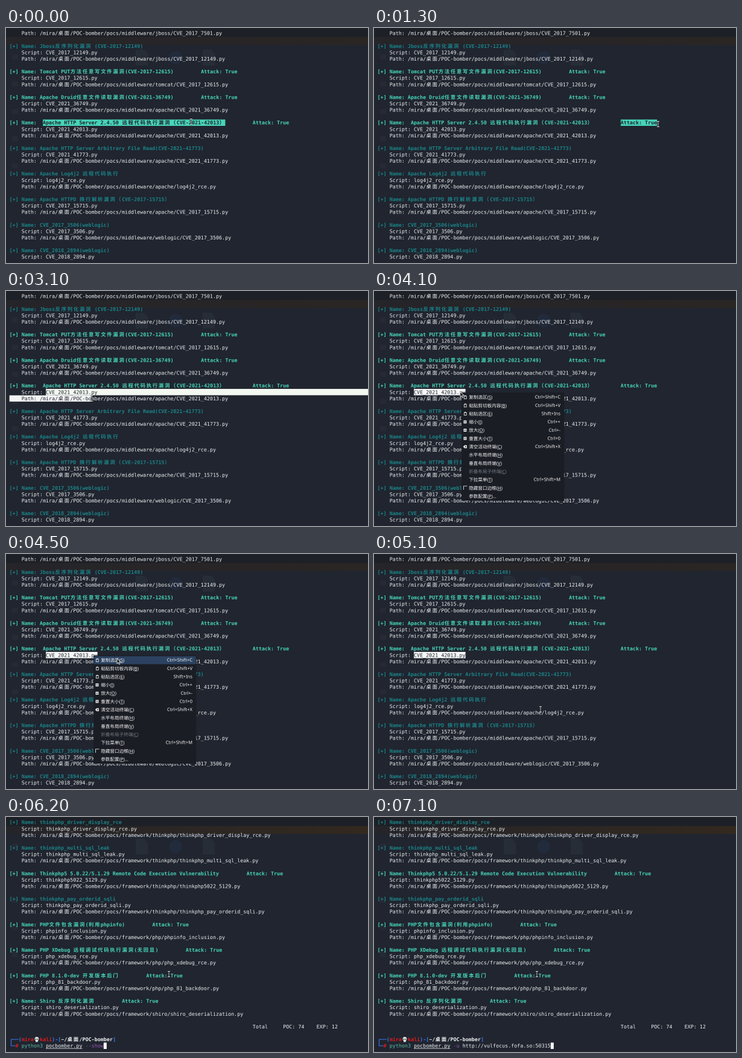
Animation of 600x389 px, one loop 8000 ms. Source, as an HTML page with a canvas:

```html
<!DOCTYPE html>
<html lang="zh">
<head>
<meta charset="utf-8">
<title>Terminal</title>
<style>
html, body { margin: 0; width: 100%; height: 100%; overflow: hidden; background: #20242e; }
canvas { display: block; width: 600px; height: 389px; }
</style>
</head>
<body>
<canvas id="stage" width="600" height="389"></canvas>
<script>
const W = 600, H = 389, LOOP = 8000, STEP = 100;
const stage = document.getElementById('stage').getContext('2d');

// Everything is drawn at double size, then scaled down for soft, exact positions.
const buffer = document.createElement('canvas');
buffer.width = W * 2;
buffer.height = H * 2;
const ctx = buffer.getContext('2d');
ctx.scale(2, 2);
ctx.textRendering = 'geometricPrecision';

const X0 = 5.6, CW = 5.04, Y0 = 3.5, RH = 10.57;
const MONO = '"DejaVu Sans Mono", "Noto Sans CJK SC", "Noto Sans CJK", monospace';
const CJK = '"Noto Sans CJK SC", "Noto Sans CJK", sans-serif';
const UI = '"Noto Sans", "Noto Sans CJK SC", "Noto Sans CJK", sans-serif';
const FG = '#eef0f1', HIT = '#47d4b9', MISS = '#1c8287', DARK = '#20242e';
const BLUE = '#367bf0', RED = '#e01b1b', GREEN = '#5ebdab', PURPLE = '#9755b3';

const colX = c => X0 + c * CW;
const rowY = r => Y0 + r * RH;
const isWide = ch => ch.codePointAt(0) > 0x2e80;
const cells = s => [...s].reduce((n, ch) => n + (isWide(ch) ? 2 : 1), 0);

function rect(x, y, w, h, color) {
  ctx.fillStyle = color;
  ctx.fillRect(x, y, w, h);
}

// Latin runs and wide characters are both pinned to the cell grid.
function cellText(row, col, text, color, bold) {
  const base = rowY(row) + 8.2, weight = bold ? 'bold ' : '';
  ctx.fillStyle = color;
  ctx.textBaseline = 'alphabetic';
  ctx.textAlign = 'left';
  for (const part of text.match(/[\u2e80-\uffff]|[^\u2e80-\uffff]+/g) || []) {
    const wide = isWide(part);
    ctx.font = weight + (wide ? '8.4px ' + CJK : '8.372px ' + MONO);
    ctx.fillText(part, colX(col) + (wide ? 0.3 : 0), base);
    col += cells(part);
  }
}

// A screen maps row numbers to runs of [col, text, color, bold, underline].
function addBlocks(rows, start, blocks) {
  blocks.forEach(([name, script, dir, hit], i) => {
    const r = start + i * 4, color = hit ? HIT : MISS;
    rows[r] = [[0, '[+] Name: ' + name, color, true]];
    if (hit) rows[r].push([10 + cells(name) + 9, 'Attack: True', color, true]);
    rows[r + 1] = [[4, `Script: ${script}.py`, FG]];
    rows[r + 2] = [[4, `Path: /mira/桌面/POC-bomber/pocs/${dir}/${script}.py`, FG]];
  });
  return rows;
}

const MW = 'middleware/', FW = 'framework/';
const listing = addBlocks({}, -2, [
  ['', 'CVE_2017_7501', MW + 'jboss'],
  ['Jboss反序列化漏洞 (CVE-2017-12149)', 'CVE_2017_12149', MW + 'jboss'],
  ['Tomcat PUT方法任意写文件漏洞(CVE-2017-12615)', 'CVE_2017_12615', MW + 'tomcat', 1],
  ['Apache Druid任意文件读取漏洞(CVE-2021-36749)', 'CVE_2021_36749', MW + 'apache', 1],
  [' Apache HTTP Server 2.4.50 远程代码执行漏洞（CVE-2021-42013）', 'CVE_2021_42013', MW + 'apache', 1],
  ['Apache HTTP Server Arbitrary File Read(CVE-2021-41773)', 'CVE_2021_41773', MW + 'apache'],
  ['Apache Log4j2 远程代码执行', 'log4j2_rce', MW + 'apache'],
  ['Apache HTTPD 换行解析漏洞（CVE-2017-15715）', 'CVE_2017_15715', MW + 'apache'],
  ['CVE_2017_3506(weblogic)', 'CVE_2017_3506', MW + 'weblogic'],
  ['CVE_2018_2894(weblogic)', 'CVE_2018_2894', MW + 'weblogic']
]);

const bottom = addBlocks({}, 0, [
  ['thinkphp_driver_display_rce', 'thinkphp_driver_display_rce', FW + 'thinkphp'],
  ['thinkphp_multi_sql_leak', 'thinkphp_multi_sql_leak', FW + 'thinkphp'],
  ['Thinkphp5 5.0.22/5.1.29 Remote Code Execution Vulnerability', 'thinkphp5022_5129', FW + 'thinkphp', 1],
  ['thinkphp_pay_orderid_sqli', 'thinkphp_pay_orderid_sqli', FW + 'thinkphp'],
  ['PHP文件包含漏洞(利用phpinfo)', 'phpinfo_inclusion', FW + 'php', 1],
  ['PHP XDebug 远程调试代码执行漏洞(无回显)', 'php_xdebug_rce', FW + 'php', 1],
  ['PHP 8.1.0-dev 开发版本后门', 'php_81_backdoor', FW + 'php', 1],
  ['Shiro 反序列化漏洞', 'shiro_deserialization', FW + 'shiro', 1]
]);
bottom[32] = [[80, 'Total', FG], [90, 'POC: 74', FG], [101, 'EXP: 12', FG]];
bottom[34] = [
  [3, '(', BLUE, true], [4, 'mira', RED, true], [10, 'kali', RED, true],
  [14, ')-[', BLUE, true], [17, '~/桌面/POC-bomber', FG, true], [34, ']', BLUE, true]
];
bottom[35] = [
  [2, '#', RED, true], [4, 'python3', GREEN], [12, 'pocbomber.py', FG, false, true]
];

function drawRow(runs, row, ink) {
  for (const [col, text, color, bold, under] of runs || []) {
    cellText(row, col, text, ink || color, bold);
    if (under) rect(colX(col), rowY(row) + 9.3, cells(text) * CW, 0.8, color);
  }
}

function drawRows(rows) {
  for (let r = 0; r < 36; r++) drawRow(rows[r], r);
}

function select(row, x1, x2, color) {
  const y = rowY(row);
  ctx.save();
  ctx.beginPath();
  ctx.rect(x1, y, x2 - x1, RH);
  ctx.clip();
  rect(x1, y, x2 - x1, RH, color);
  drawRow(listing[row], row, DARK);
  ctx.restore();
}

// Selection flowing from one row to the next.
function selectTwo(row, x1, x2) {
  select(row, x1, W, '#f3f8f1');
  select(row + 1, X0, x2, '#f3f4f4');
}

function page(x, y) {
  ctx.fillStyle = 'rgba(150,160,180,.06)';
  ctx.beginPath();
  ctx.moveTo(x - 10, y - 13);
  ctx.lineTo(x + 4, y - 13);
  ctx.lineTo(x + 10, y - 7);
  ctx.lineTo(x + 10, y + 13);
  ctx.lineTo(x - 10, y + 13);
  ctx.fill();
}

function backdrop(atEnd) {
  rect(0, 0, W, H, '#20252f');
  rect(0, 0, W, 15, '#1d2026');
  const strip = ctx.createLinearGradient(0, 0, W, 0);
  strip.addColorStop(0, '#25252a');
  strip.addColorStop(1, atEnd ? '#33291f' : '#2b2624');
  rect(0, 15, W, 13, strip);
  page(225, 49);
  page(336, 49);
  ctx.fillStyle = 'rgba(50,100,170,.1)';
  ctx.beginPath();
  ctx.arc(281, 49, 11, 0, 7);
  ctx.fill();
  for (let y = 44; y < 235; y += 45) rect(10, y, 10, 8, 'rgba(150,160,180,.04)');
}

function prompt(t) {
  ctx.strokeStyle = BLUE;
  ctx.lineWidth = 1;
  const x = 8.5, y1 = rowY(34) + 5.3, y2 = rowY(35) + 5.3;
  ctx.beginPath();
  ctx.moveTo(colX(3), y1);
  ctx.lineTo(x, y1);
  ctx.lineTo(x, y2);
  ctx.lineTo(colX(2), y2);
  ctx.stroke();

  const sx = colX(9), sy = y1 - 0.8;
  ctx.fillStyle = '#dfe3e2';
  ctx.beginPath();
  ctx.arc(sx, sy, 3.5, 0, 7);
  ctx.rect(sx - 1.9, sy + 2, 3.8, 3);
  ctx.fill();
  rect(sx - 2.3, sy - 0.4, 1.6, 1.7, '#25262c');
  rect(sx + 0.7, sy - 0.4, 1.6, 1.7, '#25262c');

  const opt = t < 6300 ? '--show' : t < 7000 ? '-' : '-u ';
  const url = t < 7100 ? '' : 'http://vulfocus.fofa.so:50315';
  cellText(35, 25, opt, PURPLE);
  cellText(35, 25 + opt.length, url, FG);
  rect(colX(25 + opt.length + url.length), rowY(35), CW, RH, '#f4f5f5');
}

const items = [
  ['复制选区(', 'S', ')', 'Ctrl+Shift+C', 'copy'],
  ['粘贴剪切板内容(', 'B', ')', 'Ctrl+Shift+V', 'copy'],
  ['粘贴选区(', 'E', ')', 'Shift+Ins', 'copy'],
  ['缩小(', 'I', ')', 'Ctrl++', 'box'],
  ['放大(', 'O', ')', 'Ctrl+-', 'box'],
  ['重置大小(', 'T', ')', 'Ctrl+0', 'box'],
  ['清空活动终端(', 'C', ')', 'Ctrl+Shift+X', 'clear'],
  ['水平布局终端(', 'H', ')', ''],
  ['垂直布局终端(', 'V', ')', ''],
  ['折叠布局子终端(', 'C', ')', '', '', true],
  ['下拉菜单(', 'T', ')', 'Ctrl+Shift+M'],
  ['隐藏窗口边框(', 'H', ')', '', 'check'],
  ['参数配置(', 'P', ')...', '']
];

function icon(kind, x, y) {
  ctx.strokeStyle = '#dfe1e3';
  ctx.lineWidth = 0.9;
  if (kind === 'copy') {
    ctx.strokeRect(x - 1.6, y - 1.8, 3.8, 4.4);
    rect(x - 1, y - 3, 2.6, 1.6, '#dfe1e3');
  } else if (kind === 'box') {
    rect(x - 2.5, y - 2.5, 5, 5, '#dfe1e3');
    rect(x - 1.3, y - 0.5, 2.6, 1, '#1b1d24');
  } else if (kind === 'clear') {
    ctx.fillStyle = '#dfe1e3';
    ctx.beginPath();
    ctx.moveTo(x - 3.3, y);
    ctx.lineTo(x - 1, y - 2.5);
    ctx.lineTo(x + 3, y - 2.5);
    ctx.lineTo(x + 3, y + 2.5);
    ctx.lineTo(x - 1, y + 2.5);
    ctx.fill();
    rect(x, y - 0.8, 1.6, 1.6, '#1b1d24');
  } else if (kind === 'check') {
    ctx.beginPath();
    ctx.moveTo(x - 2.5, y + 3);
    ctx.lineTo(x - 2.5, y - 3);
    ctx.lineTo(x + 3.5, y - 3);
    ctx.stroke();
  }
}

function menu(mx, my) {
  rect(145, 168, 170.5, 179, '#1b1d24');
  ctx.font = '7.6px ' + UI;
  ctx.textBaseline = 'alphabetic';
  items.forEach(([head, key, tail, combo, kind, off], i) => {
    const y = 175.8 + i * 13.65;
    if (mx > 147 && Math.abs(my - y) < 6.8) rect(146, y - 6.6, 168.5, 13.2, '#2c4260');
    icon(kind, 151, y);
    ctx.fillStyle = off ? '#747981' : '#f2f4f5';
    ctx.textAlign = 'left';
    ctx.fillText(head + key + tail, 157.2, y + 2.8);
    const kx = 157.2 + ctx.measureText(head).width;
    ctx.fillRect(kx, y + 3.8, ctx.measureText(key).width, 0.7);
    ctx.textAlign = 'right';
    ctx.fillText(combo, 309, y + 2.4);
  });
}

// Pointer path: time, x, y
const path = [
  [0, 307, 155], [100, 300, 155], [700, 434, 155], [900, 434, 155],
  [1000, 410, 159], [1300, 471, 159], [1600, 471, 159],
  [2200, 67, 167], [2300, 67, 167], [2500, 72, 166], [2600, 72, 166],
  [3000, 139, 175], [3100, 142, 178], [3200, 146, 176], [3400, 153, 170],
  [3600, 153, 170], [3900, 143, 171], [4100, 143, 171],
  [4500, 184, 177], [4600, 184, 177], [5100, 276, 257],
  [5200, 276, 257], [5600, 270, 260], [8000, 270, 260]
];

function pointerAt(t) {
  const i = Math.max(1, path.findIndex(p => p[0] >= t));
  const [t0, x0, y0] = path[i - 1], [t1, x1, y1] = path[i];
  const k = (t - t0) / (t1 - t0);
  return [x0 + (x1 - x0) * k, y0 + (y1 - y0) * k];
}

function beam(x, y) {
  const shape = (w, color) => {
    ctx.strokeStyle = color;
    ctx.lineWidth = w;
    ctx.beginPath();
    ctx.moveTo(x - 2, y - 4.5);
    ctx.lineTo(x + 2, y - 4.5);
    ctx.moveTo(x, y - 4.5);
    ctx.lineTo(x, y + 4.5);
    ctx.moveTo(x - 2, y + 4.5);
    ctx.lineTo(x + 2, y + 4.5);
    ctx.stroke();
  };
  shape(2, '#15171c');
  shape(0.9, '#d5d7d9');
}

function arrow(x, y) {
  const pts = [[0, 8.5], [2, 6.6], [3.4, 9.6], [4.8, 9], [3.5, 6], [6, 5.8]];
  ctx.beginPath();
  ctx.moveTo(x, y);
  for (const [dx, dy] of pts) ctx.lineTo(x + dx, y + dy);
  ctx.closePath();
  ctx.fillStyle = '#111318';
  ctx.fill();
  ctx.strokeStyle = '#e8e9ea';
  ctx.lineWidth = 0.8;
  ctx.stroke();
}

function selections(t, x) {
  const edge = colX(Math.round((x - X0) / CW));
  if (t < 1000) select(14, colX(11), colX(71), HIT);
  else if (t < 2200) select(14, colX(80), t < 1300 ? edge : colX(92), HIT);
  else if (t < 2400) return;
  else if (t < 2900) select(15, colX(12), edge, '#f6f7f7');
  else if (t < 3300) selectTwo(15, colX(12), edge);
  else if (t < 5300) select(15, colX(12), colX(29), '#f6f7f7');
  else if (t >= 5400 && t < 5600) selectTwo(23, colX(54), edge);
}

function draw(t) {
  const [x, y] = pointerAt(t), atEnd = t >= 6200;
  backdrop(atEnd);
  if (atEnd) {
    drawRows(bottom);
    prompt(t);
  } else {
    drawRows(listing);
    selections(t, x);
  }
  const open = t >= 4100 && t < 4700;
  if (open) {
    menu(x, y);
    arrow(x, y - 4);
  } else {
    beam(x, y);
  }
  stage.drawImage(buffer, 0, 0, W, H);
}

const start = performance.now();
function tick() {
  const t = (performance.now() - start) % LOOP;
  draw(Math.floor(t / STEP) * STEP);
  requestAnimationFrame(tick);
}
tick();
</script>
</body>
</html>
```
